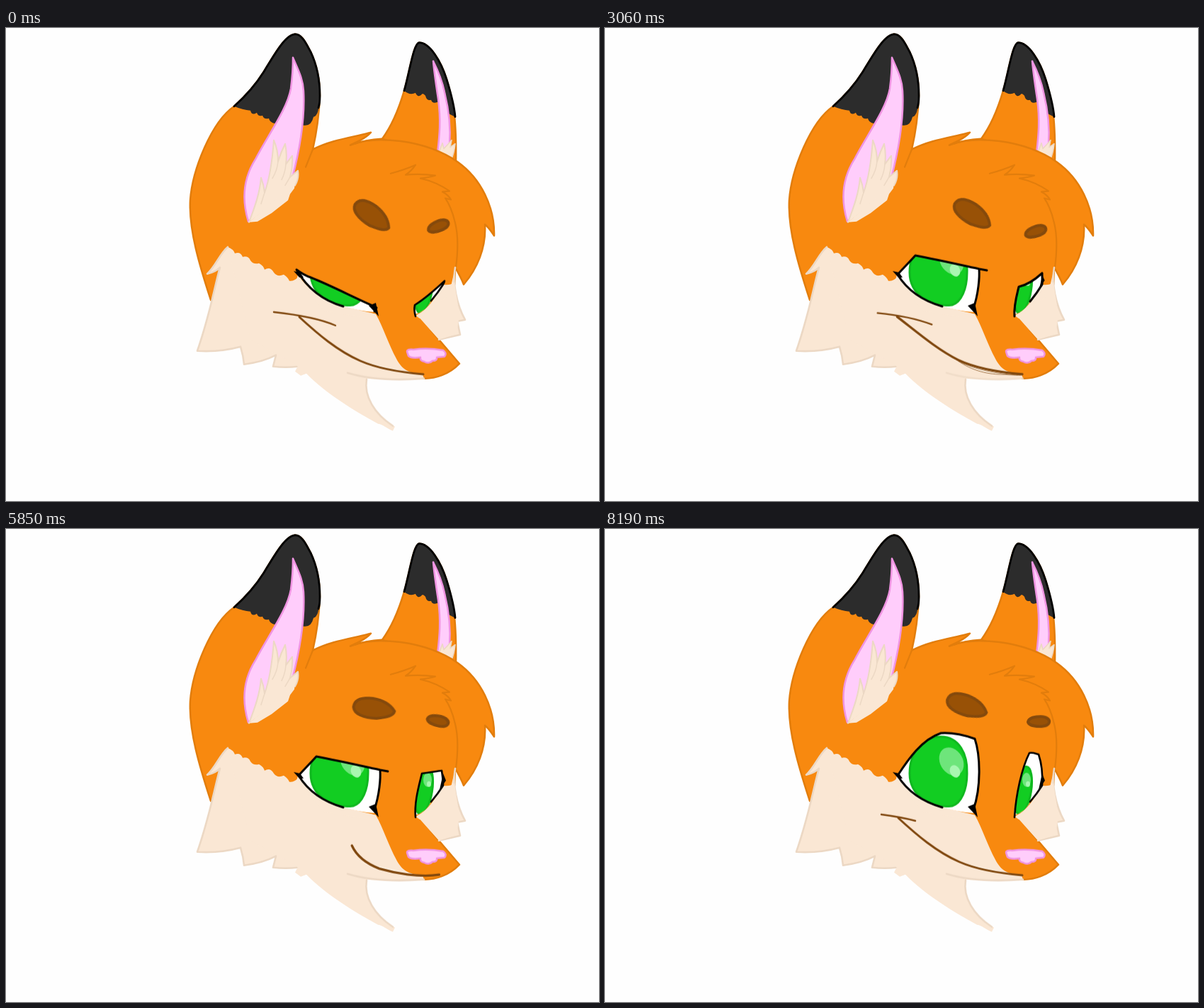
Write an HTML page without scripts that moves like this. It is 837x669 px and loops after 8.28 s.

```html
<!DOCTYPE html>
<html lang="en">
<head>
<meta charset="utf-8">
<title>Fox expressions</title>
<style>
html, body { margin: 0; width: 100%; height: 100%; overflow: hidden; background: #fefefe; }
svg { display: block; width: 100vw; height: 100vh; }
path { fill: none; stroke-linecap: round; stroke-linejoin: round; }
.orange { fill: #f8890f; stroke: #e27d0c; stroke-width: 2.5; }
.hair { stroke: #e27d0c; stroke-width: 2.2; }
.dark { fill: #2c2c2c; }
.edge { stroke: #000; stroke-width: 2.8; }
.pink { fill: #ffcdfb; stroke: #f094e2; stroke-width: 2.5; }
.cream { fill: #fae7d4; }
.fur { fill: #fae7d4; stroke: #ecd8c4; stroke-width: 2.6; }
.jaw { stroke: #ecd8c4; stroke-width: 2.6; }
.ink { fill: #000; }
.iris { fill: #12cd22; stroke: #0fb81f; stroke-width: 3; }
.shine { fill: #6ee57b; }
.glint { fill: #a8f7b0; }
.brow { fill: #985106; stroke: #84490c; stroke-width: 4; }
.line { stroke: #7f470e; stroke-width: 3; }
.teeth { fill: #fff4e6; stroke: #7f470e; }
.tongue { fill: #c8ff23; }

/* every pose moves in 90 ms steps; the offset keeps samples off the step edges */
.left, .right, .lower, .brow, .mouth, .dimple, .teeth, .chin, .lick { animation: left 8.28s -10ms infinite; }
.right { animation-name: right; }
.lower { animation-name: lower; }
.brow { animation-name: brow; }
.mouth { animation-name: mouth; }
.dimple { animation-name: dimple; }
.teeth { animation-name: teeth; }
.chin { animation-name: chin; }
.lick { animation-name: lick; transform-origin: 565px 488px; }

.left.open {
  --angry: path("M412 343C418 347 424 350 430 352C460 366 490 380 522 394C522 396 521 399 520 401C505 400 490 397 476 393C448 385 426 369 412 343Z");
  --squint: path("M412 344C418 350 424 354 430 357C460 371 490 384 522 397C522 398 521 400 520 401C505 400 490 397 476 393C448 385 426 369 412 344Z");
  --shut: path("M410 344C418 356 429 367 444 376C465 390 495 399 524 405C524 405 522 404 520 403C505 401 490 398 476 393C450 384 428 369 410 344Z");
  --mid: path("M414 348C420 340 430 330 438 321C470 327 505 335 528 341C529 352 527 375 520 401C505 400 490 397 476 393C448 385 426 369 414 348Z");
  --joy: path("M413 348C440 350 470 356 492 372C508 383 517 394 525 405C525 405 525 405 525 405C517 394 508 383 492 372C470 356 440 350 413 348Z");
  --wide: path("M414 348C428 325 447 297 474 288C490 287 508 291 522 296C530 320 531 365 520 401C505 400 490 397 476 393C448 385 426 369 414 348Z");
}
.left.rim {
  --angry: path("M476 393C448 385 426 369 410 341C418 347 424 350 430 352C460 364 490 380 522 394C522 396 521 399 520 400M522 394L523 395");
  --squint: path("M476 393C448 385 426 369 410 342C418 350 424 354 430 357C460 369 490 384 522 397C522 398 521 400 520 400M522 397L523 398");
  --shut: path("M476 393C450 384 428 369 410 344C418 356 429 367 444 376C465 390 495 399 524 405C524 405 524 405 524 405M524 405L525 405");
  --mid: path("M476 393C448 385 426 369 413 348C420 340 430 330 438 321C470 327 505 335 528 340C529 352 527 375 520 396M528 340L539 342");
  --joy: path("M492 372C470 356 440 350 413 348C440 350 470 356 492 372C508 383 517 394 525 405C525 405 525 405 525 405M525 405L525 405");
  --wide: path("M476 393C448 385 426 369 413 348C428 325 447 297 474 288C490 287 508 291 522 296C530 320 531 365 520 396M522 296L522 297");
}
.left.corner {
  --o: path("M512 392L522 388L526 407Z");
  --s: path("M521 401L527 401L527 409Z");
  --angry: var(--o); --squint: var(--o); --mid: var(--o); --wide: var(--o); --shut: var(--s); --joy: var(--s);
}
.right.open {
  --angry: path("M577 404C576 399 576 395 577 391C590 383 605 370 618 358C618 359 618 360 617 362C612 370 606 378 600 385C596 393 589 401 577 404Z");
  --squint: path("M577 404C576 401 576 398 577 395C592 387 606 373 618 359C618 360 618 361 617 362C612 370 606 378 600 385C596 393 589 401 577 404Z");
  --shut: path("M578 406C578 406 578 406 578 406C594 400 604 384 618 360C618 360 618 361 617 362C612 371 606 380 600 388C594 396 587 402 578 406Z");
  --mid: path("M577 404C578 385 583 362 587 346C597 344 607 342 615 341C616 348 617 355 617 362C612 370 606 378 600 385C596 393 589 401 577 404Z");
  --joy: path("M578 406C578 406 578 406 578 406C585 385 600 364 626 362C626 362 626 362 626 362C612 364 601 369 594 376C587 383 582 392 578 406Z");
  --wide: path("M577 404C580 375 588 338 599 316C604 315 608 317 612 318C616 330 618 345 617 362C612 370 606 378 600 385C596 393 589 401 577 404Z");
}
.right.rim {
  --angry: path("M578 407C576 400 576 396 577 391C590 383 605 370 619 357C618 359 618 360 617 362C612 370 606 378 600 385");
  --squint: path("M578 407C576 402 576 398 577 395C592 387 606 373 619 358C618 360 618 361 617 362C612 370 606 378 600 385");
  --shut: path("M578 407C578 407 578 406 578 406C594 400 604 384 621 356C619 359 618 361 617 362C612 371 606 380 600 388");
  --mid: path("M578 407C576 385 583 362 587 345C597 344 607 342 615 341C616 348 617 355 617 362C612 370 606 378 600 385");
  --joy: path("M578 407C578 407 578 406 578 406C585 385 600 364 626 362C626 362 626 362 626 362C612 364 601 369 594 376");
  --wide: path("M578 407C580 375 588 338 599 316C604 315 608 317 612 318C616 330 618 345 617 362C612 370 606 378 600 385");
}
.right.corner {
  --o: path("M612 368L617 345L621 355Z");
  --s: path("M616 363L618 357L620 359Z");
  --angry: var(--s); --squint: var(--s); --shut: var(--s); --joy: path("M619 365L627 357L628 362Z"); --mid: var(--o); --wide: var(--o);
}
@keyframes left {
  0%, 1.087% { d: var(--angry); stroke-width: 3; animation-timing-function: steps(2, start); }
  3.261%, 6.522% { d: var(--squint); stroke-width: 3; animation-timing-function: steps(7, start); }
  14.13%, 15.217% { d: var(--shut); stroke-width: 5.5; animation-timing-function: steps(6, start); }
  21.739%, 73.913% { d: var(--mid); stroke-width: 3; animation-timing-function: steps(5, start); }
  79.348%, 80.435% { d: var(--joy); stroke-width: 5.5; animation-timing-function: steps(10, start); }
  91.304%, 100% { d: var(--wide); stroke-width: 3; }
}
@keyframes right {
  0%, 1.087% { d: var(--angry); stroke-width: 2.6; animation-timing-function: steps(2, start); }
  3.261%, 6.522% { d: var(--squint); stroke-width: 2.6; animation-timing-function: steps(7, start); }
  14.13%, 15.217% { d: var(--shut); stroke-width: 4.5; animation-timing-function: steps(6, start); }
  21.739%, 34.783% { d: var(--mid); stroke-width: 2.6; animation-timing-function: steps(9, start); }
  44.565%, 47.826% { d: var(--shut); stroke-width: 4; animation-timing-function: steps(4, start); }
  52.174%, 73.913% { d: var(--mid); stroke-width: 2.6; animation-timing-function: steps(5, start); }
  79.348%, 80.435% { d: var(--joy); stroke-width: 4.5; animation-timing-function: steps(10, start); }
  91.304%, 100% { d: var(--wide); stroke-width: 2.6; }
}

/* cheeks push up under the eyes in the laughing pose */
.lower.l {
  --low: path("M412 348C426 369 448 385 476 393C490 397 505 400 522 404L524 412L450 400L410 356Z");
  --joy: path("M412 348C440 350 470 356 492 372C508 383 517 394 525 405L524 412L450 400L410 356Z");
}
.lower.r {
  --low: path("M578 406C594 400 604 384 617 362L622 380L584 410Z");
  --joy: path("M578 406C585 385 600 364 627 362L622 380L584 410Z");
}
@keyframes lower {
  0%, 73.913% { d: var(--low); animation-timing-function: steps(5, start); }
  79.348%, 80.435% { d: var(--joy); animation-timing-function: steps(10, start); }
  91.304%, 100% { d: var(--low); }
}

.brow.l {
  --angry: translate(517px, 264.5px) rotate(31deg);
  --calm: translate(517px, 258px) rotate(27deg);
  --wink: translate(522.5px, 270.5px) rotate(29deg);
  --flat: translate(519.5px, 253px) rotate(2deg);
  --joy: translate(517px, 293px) rotate(1deg);
  --up: translate(511px, 249px) rotate(14deg);
}
.brow.r {
  --angry: translate(610px, 279.5px) rotate(-20deg);
  --calm: translate(609.5px, 275.5px) rotate(-11deg);
  --wink: translate(604px, 310px) rotate(-30deg);
  --flat: translate(609.5px, 270.5px) rotate(14deg);
  --joy: translate(607px, 298.5px) rotate(13deg);
  --up: translate(612px, 271.5px) rotate(1deg);
}
@keyframes brow {
  0%, 23.913% { transform: var(--angry); animation-timing-function: steps(4, start); }
  28.261%, 34.783% { transform: var(--calm); animation-timing-function: steps(9, start); }
  44.565%, 47.826% { transform: var(--wink); animation-timing-function: steps(4, start); }
  52.174%, 73.913% { transform: var(--flat); animation-timing-function: steps(5, start); }
  79.348%, 80.435% { transform: var(--joy); animation-timing-function: steps(10, start); }
  91.304%, 100% { transform: var(--up); }
}

.mouth {
  --smirk: path("M414 408C440 432 468 456 500 470C525 481 555 486 589 489");
  --grin: path("M409 407C440 423 468 448 495 466C522 481 555 486 589 489");
  --small: path("M508 457C508 470 517 478 535 483C555 487 590 494 617 488");
}
@keyframes mouth {
  0%, 34.783% { d: var(--smirk); stroke-width: 3; animation-timing-function: steps(9, start); }
  44.565%, 63.043% { d: var(--grin); stroke-width: 3.8; animation-timing-function: steps(10, start); }
  73.913%, 91.304% { d: var(--small); stroke-width: 3.2; animation-timing-function: steps(8, start); }
  100% { d: var(--smirk); stroke-width: 3; }
}
@keyframes dimple {
  0%, 34.783% { d: path("M378 401C405 404 440 409 465 420"); stroke-width: 2.4; animation-timing-function: steps(9, start); }
  44.565%, 53.261% { d: path("M398 405C415 406 435 411 454 416"); stroke-width: 2.2; animation-timing-function: steps(4, start); }
  57.609%, 91.304% { d: path("M410 408C411 408 412 409 413 409"); stroke-width: 0; animation-timing-function: steps(8, start); }
  100% { d: path("M390 403C405 405 420 407 438 412"); stroke-width: 2.4; }
}
.teeth {
  --closed: path("M490 464C520 481 555 487 588 489L588 489C578 489 568 488 556 486C534 483 512 477 490 464ZM500 470C525 482 555 487 582 489");
  --bared: path("M490 464C520 481 555 486 588 489L584 493C576 493 566 492 556 495C530 498 508 488 490 464ZM498 472C520 485 552 490 583 492");
}
@keyframes teeth {
  0%, 34.783% { d: var(--closed); stroke-width: 0; animation-timing-function: steps(9, start); }
  44.565%, 47.826% { d: var(--bared); stroke-width: 2.2; animation-timing-function: steps(4, start); }
  52.174%, 100% { d: var(--closed); stroke-width: 0; }
}
@keyframes chin {
  0%, 34.783% { opacity: 1; animation-timing-function: steps(9, start); }
  44.565%, 47.826% { opacity: 0; animation-timing-function: steps(4, start); }
  52.174%, 100% { opacity: 1; }
}
@keyframes lick {
  0%, 53.261% { transform: scale(.8, 0); animation-timing-function: steps(4, start); }
  57.609%, 63.043% { transform: none; animation-timing-function: steps(5, start); }
  68.478%, 100% { transform: scale(.8, 0); }
}
</style>
</head>
<body>
<svg viewBox="0 -0.7 837 669">
  <defs>
    <clipPath id="eyeL"><path class="left open"/></clipPath>
    <clipPath id="eyeR"><path class="right open"/></clipPath>
  </defs>

  <!-- far ear -->
  <path class="orange" d="M531 156C545 137 555 112 562 88C570 60 575 22 583 20C598 20 614 46 622 72C632 104 636 130 635 190Z"/>
  <path class="dark" d="M562 88C570 60 575 22 583 20C598 20 614 46 622 72C630 98 633 112 634 125L626 121L609 104Q602 107 600 101Q594 103 592 95Q588 90 586 94Q581 98 578 91Q570 95 562 88Z"/>
  <path class="edge" d="M562 88C570 60 575 22 583 20C598 20 614 46 622 72C630 98 633 112 634 125"/>
  <path class="pink" d="M603 46C610 60 616 75 619 90C625 115 628 140 626 165L609 176C612 150 614 130 610 100C607 80 604 60 603 46Z"/>
  <path class="fur" style="stroke-width:1.6" d="M610 178L616 162L618 170L629 158L627 168L634 163C633 173 631 180 628 187Z"/>

  <!-- head and near ear -->
  <path class="orange" d="M289 384C273 335 258 285 260 243C263 200 290 132 322 110C342 92 354 77 364 61C378 38 394 9 408 8C418 8 424 22 430 33C438 50 443 70 443 95C442 120 439 145 433 171C460 157 490 154 515 147C508 155 498 159 486 165C520 151 590 156 638 189C670 212 690 252 689 293C685 287 681 281 676 277C678 310 665 340 646 362C642 352 638 345 634 338L633 362L612 400L600 427L640 474C625 490 605 495 592 495L520 480L310 400Z"/>
  <path class="hair" d="M433 171L423 196M486 165Q508 157 530 156M543 205Q562 200 578 193Q572 202 564 207Q585 205 606 208Q594 211 585 212Q608 217 626 230L616 231Q624 235 628 242L620 240Q629 253 634 275C639 295 638 315 635 338"/>
  <path class="dark" d="M322 110C342 92 354 77 364 61C378 38 394 9 408 8C418 8 424 22 430 33C438 50 443 70 443 95Q443 108 440 118Q438 124 434 125Q431 138 421 137L378 134Q372 132 371 127Q364 129 362 123Q356 125 354 119Q347 124 345 116Q334 115 322 110Z"/>
  <path class="edge" d="M322 110C342 92 354 77 364 61C378 38 394 9 408 8C418 8 424 22 430 33C438 50 443 70 443 95Q443 106 441 112"/>
  <path class="pink" d="M405 41C412 58 419 70 420 88C422 125 415 170 404 212L342 273C332 240 335 212 352 185C370 150 397 114 402 85Q405 62 405 41Z"/>
  <path class="fur" style="stroke-width:2" d="M343 274C350 255 358 235 360 211Q364 222 365 232C373 210 376 185 378 158Q384 172 384 188Q388 175 394 163Q397 178 395 192L404 180Q405 195 401 210L412 201Q414 212 408 222"/>
  <path class="cream" d="M343 274L408 218L407 226L401 234L398 243L375 261L355 273Z"/>
  <path class="jaw" style="stroke-width:1.5" d="M384 188Q383 200 376 212M395 192Q394 204 389 214M401 210L394 222M365 232L360 248"/>

  <!-- cream fur -->
  <path class="fur" d="M634 338C630 360 636 390 648 412L637 414L641 433L611 440"/>
  <path class="cream" d="M617 362Q626 364 633 359L640 405L636 432L611 440L580 405C594 399 606 382 617 362Z"/>
  <path class="fur" d="M313 309C302 318 296 336 284 347Q295 345 302 338C296 360 291 385 284 410Q277 436 270 456Q302 458 331 450Q335 463 336 475Q362 472 381 462L377 478Q395 480 412 478"/>
  <path class="cream" d="M313 309Q321 312 323 318Q331 315 334 323Q342 321 345 328Q349 334 357 332Q363 335 365 341Q373 336 378 345Q383 352 392 348Q398 352 400 357Q406 358 412 352C426 369 448 385 476 393C490 397 505 400 522 404C532 421 540 447 551 467C558 480 566 488 588 489L590 495C560 498 530 497 510 495C505 522 522 546 549 563L546 569C538 566 532 560 525 559C490 540 450 515 424 488L416 491L408 485L412 477L345 440Z"/>
  <path class="jaw chin" d="M482 487Q525 500 590 495"/>
  <path class="jaw" d="M509 496C505 520 520 545 546 562"/>
  <path class="cream lower l"/>
  <path class="cream lower r"/>
  <path class="pink" d="M566 457Q566 453 575 454Q595 451 617 455Q623 459 619 464L608 465Q609 470 602 470Q597 475 590 471Q584 470 585 465Q572 467 568 463Z"/>

  <!-- eyes -->
  <g clip-path="url(#eyeL)">
    <rect x="400" y="280" width="140" height="130" fill="#fff"/>
    <path class="iris" d="M430 345C430 314 450 293 474 293C500 293 512 318 511 345C511 368 503 387 490 391C460 395 430 376 430 345Z"/>
    <ellipse class="shine" cx="489" cy="328" rx="16" ry="21" transform="rotate(-30 489 328)"/>
    <ellipse class="glint" cx="494" cy="342" rx="7" ry="9" transform="rotate(-25 494 342)"/>
  </g>
  <path class="edge left rim"/>
  <path class="ink left corner"/>
  <path class="ink" d="M406 343L415 345L420 352L414 352Z"/>
  <g clip-path="url(#eyeR)">
    <rect x="570" y="310" width="60" height="100" fill="#fff"/>
    <ellipse class="iris" cx="590" cy="369" rx="11.5" ry="34" transform="rotate(9 590 369)"/>
    <ellipse class="shine" cx="595" cy="354" rx="6" ry="10"/>
    <ellipse class="glint" cx="597" cy="360" rx="3" ry="4"/>
  </g>
  <path class="edge right rim"/>
  <path class="ink right corner"/>

  <path class="brow l" d="M-29 -1C-28 -12 -16 -15 -2 -14C13 -12 23 -6 29 3C28 9 20 12 4 14C-14 14 -28 9 -29 -1Z"/>
  <path class="brow r" d="M-15 1C-14 -5 -5 -7 3 -7C11 -7 16 -3 15 1C14 5 8 7 1 7C-7 7 -14 5 -15 1Z"/>

  <!-- mouth -->
  <g class="lick">
    <path class="tongue" d="M540 485C553 492 553 505 556 517C562 526 578 524 584 516C592 505 590 496 588 489Z"/>
    <path d="M574 494Q576 500 572 504" stroke="#9fd010" stroke-width="2"/>
  </g>
  <path class="teeth"/>
  <path class="line mouth"/>
  <path class="line dimple"/>
</svg>
</body>
</html>
```
